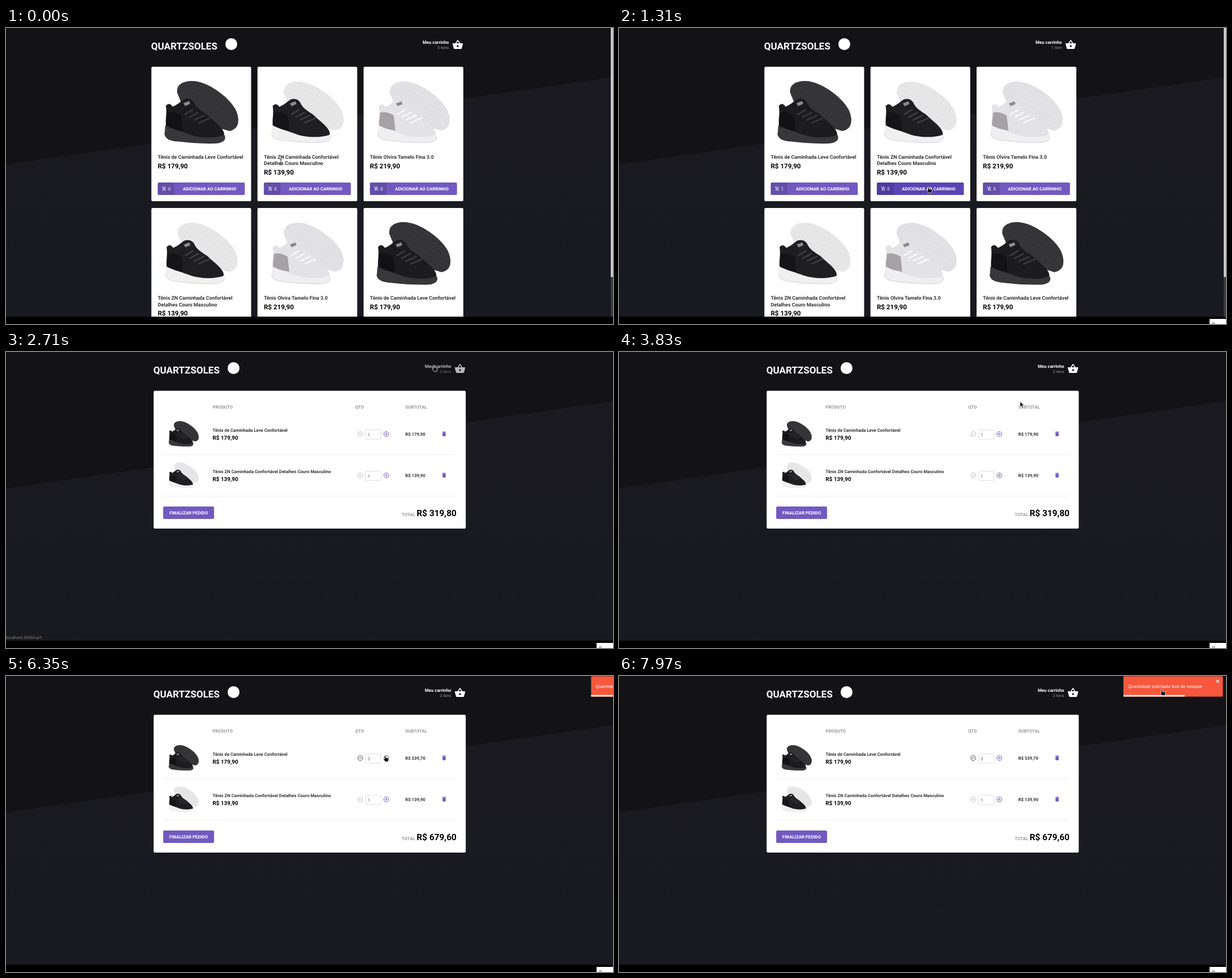
An HTML page for the animation above (8000 ms loop, 1071 by 523 pixels).

```html
<!DOCTYPE html>
<html lang="pt-BR">
<head>
<meta charset="utf-8">
<title>Carrinho</title>
<style>
  html, body { margin: 0; width: 100%; height: 100%; overflow: hidden; background: #000; }
  svg { display: block; width: 1071px; height: 523px; }
  text { font-family: Roboto, sans-serif; font-weight: 700; text-rendering: geometricPrecision; white-space: pre; }
  .thin { font-weight: 400; }
  .toast text { font-family: "Liberation Sans", Arial, sans-serif; font-weight: 400; }
  .status text { font-family: "Noto Sans", sans-serif; font-weight: 400; }
  .add.hover .fill { fill: #5b43b4; }
  .link.hover { opacity: .7; }
</style>
</head>
<body>
<svg id="stage" viewBox="0 0 1071 523" xmlns="http://www.w3.org/2000/svg"></svg>
<script>
const LOOP = 8000;
const PURPLE = '#7159c1';
const PATHS = {
  basket: 'M17.21 9l-4.38-6.56c-.19-.28-.51-.42-.83-.42-.32 0-.64.14-.83.43L6.79 9H2c-.55 0-1 .45-1 1 0 .09.01.18.04.27l2.54 9.27c.23.84 1 1.46 1.92 1.46h13c.92 0 1.69-.62 1.93-1.46l2.54-9.27L23 10c0-.55-.45-1-1-1h-4.79zM9 9l3-4.4L15 9H9zm3 8c-1.1 0-2-.9-2-2s.9-2 2-2 2 .9 2 2-.9 2-2 2z',
  addCart: 'M11 9h2V6h3V4h-3V1h-2v3H8v2h3v3zm-4 9a2 2 0 1 0 0 4 2 2 0 0 0 0-4zm10 0a2 2 0 1 0 0 4 2 2 0 0 0 0-4zm-9.83-3.25l.03-.12.9-1.63h7.45c.75 0 1.41-.41 1.75-1.03l3.86-7.01L19.42 4h-.01l-1.1 2-2.76 5H8.53L4.27 2H1v2h2l3.6 7.59-1.35 2.45c-.16.28-.25.61-.25.96 0 1.1.9 2 2 2h12v-2H7.42c-.13 0-.25-.11-.25-.25z',
  trash: 'M6 19c0 1.1.9 2 2 2h8c1.1 0 2-.9 2-2V7H6v12zM19 4h-3.5l-1-1h-5l-1 1H5v2h14V4z',
  hand: 'M-1.2 1Q0-.4 1.1 1V4.6Q2.2 3.9 2.9 4.8Q4 4.2 4.6 5.2Q6 4.8 6.1 6.4V8.6L5 11.4H.2L-2.9 7.4Q-3.2 5.9-1.2 6.6Z',
  arrow: 'M0 0V10L2.4 7.9L4 11.5L5.6 10.8L4 7.3H7.2Z',
  ibeam: 'M-2-5Q0-5 0-4Q0-5 2-5M0-4V4M-2 5Q0 5 0 4Q0 5 2 5'
};

const text = (x, y, str, size, fill = '#fff', extra = '') =>
  `<text x="${x}" y="${y}" font-size="${size}" fill="${fill}" ${extra}>${str}</text>`;
const box = (x, y, w, h, fill, extra = '') =>
  `<rect x="${x}" y="${y}" width="${w}" height="${h}" fill="${fill}" ${extra}/>`;
const icon = (name, x, y, size, fill) =>
  `<path d="${PATHS[name]}" transform="translate(${x} ${y}) scale(${size / 24})" fill="${fill}"/>`;

const WALK = 'Tênis de Caminhada Leve Confortável';
const LEATHER = ['Tênis ZN Caminhada Confortável', 'Detalhes Couro Masculino'];
const PRODUCTS = {
  dark: { lines: [WALK], price: 'R$ 179,90', back: '#39393b', ridge: '#2b2b2d', upper: '#1c1c1e', sole: '#38383b', heel: '#121214', lace: '#3d3d40' },
  duo: { lines: LEATHER, price: 'R$ 139,90', back: '#ebebec', ridge: '#dadadc', upper: '#1f1f22', sole: '#f0f0f1', heel: '#151517', lace: '#424246' },
  light: { lines: ['Tênis Olvira Tamelo Fina 3.0'], price: 'R$ 219,90', back: '#e6e5e7', ridge: '#d5d4d7', upper: '#e3e2e4', sole: '#efeff1', heel: '#a5a1a5', lace: '#fafafa' }
};

// Centred on its own middle, about 130 by 111.
function shoe(kind, x, y, scale) {
  const p = PRODUCTS[kind];
  const sole = 'M302 114C300 98 316 92 334 94C362 98 396 125 406 146C413 163 411 179 394 182L360 172L310 134Z';
  const laces = [0, 1, 2, 3].map(i => `M${315 + i * 8} ${153 + i * 5}l${15 + i * 2} -9`).join('');
  return `<g transform="translate(${x} ${y}) scale(${scale}) translate(-345 -148.5)">
    <path d="${sole}" fill="${p.back}"/><path d="${sole}" fill="url(#ridge-${kind})"/>
    <path d="M282 138C285 133 290 133 294 139C302 136 308 130 314 126C322 123 329 126 332 132C336 142 346 147 356 154C368 166 384 176 385 187L383 196H330L284 181C279 165 285 152 282 138Z" fill="${p.upper}"/>
    <path d="M284 150C292 147 302 150 309 155L312 182L283 176C281 167 285 159 284 150Z" fill="${p.heel}"/>
    <path d="${laces}" stroke="${p.lace}" stroke-width="2.4" fill="none"/>
    <path d="M313 133l10-4 2 5-9 4z" fill="#8b8b8e"/>
    <path d="M281 172C296 180 312 183 326 189C345 195 370 195 386 189C388 197 382 203 368 203.5C345 204 320 202 304 200C290 199 281 196 280 186Z" fill="${p.sole}"/>
    <path d="M280 186C281 196 290 199 304 200C320 202 345 204 368 203.5C382 203 387 198 386 192" fill="none" stroke="${p.ridge}" stroke-width="1.2"/>
  </g>`;
}

function card(kind, col, row) {
  const p = PRODUCTS[kind];
  const x = 256.5 + col * 187.2, y = 68.5 + row * 249.4, left = x + 11.2;
  const priceY = y + 179 + (p.lines.length - 1) * 11.2;
  return box(x, y, 176, 237.6, '#fff', 'rx="2.2"') + shoe(kind, x + 88.5, y + 80, kind === 'dark' ? 1 : .98) +
    p.lines.map((s, i) => text(left, y + 162.4 + i * 11.2, s, 8.9, '#333')).join('') +
    text(left, priceY, p.price, 11.6, '#000') +
    `<g class="add">${box(left, y + 204.4, 153.6, 22.2, PURPLE, 'class="fill" rx="2.2"')}
      ${box(left, y + 204.4, 29.3, 22.2, '#000', 'opacity=".12" rx="2.2"')}
      ${icon('addCart', left + 6.9, y + 210.9, 8.9, '#fff')}
      ${text(left + 18.4, y + 218.4, '0', 7.8, '#fff', 'class="thin count"')}
      ${text(left + 91.5, y + 218.2, 'ADICIONAR AO CARRINHO', 7.81, '#fff', 'text-anchor="middle"')}</g>`;
}

const round = (x, y, color, plus, cls) =>
  `<g class="${cls}" stroke="${color}" fill="none" stroke-width="1"><circle cx="${x}" cy="${y}" r="4.3"/>
   <path d="M${x - 2.3} ${y}h4.6${plus ? `M${x} ${y - 2.3}v4.6` : ''}"/></g>`;

function row(kind, y) {
  const p = PRODUCTS[kind];
  return shoe(kind, 313.7, y - .5, .406) +
    text(364.5, y - 4, p.lines.join(' '), 7.78, '#333') + text(364.5, y + 10, p.price, 9.9, '#000') +
    round(625, y, '#bdbdc0', false, 'minus') + round(671, y, PURPLE, true, 'plus') +
    box(634.5, y - 7.2, 27.5, 16.2, '#fff', 'rx="1.5" stroke="#ddd"') +
    text(638, y + 4, '1', 7.8, '#666', 'class="thin qty"') +
    text(704.5, y + 3, p.price, 7.75, '#333', 'class="sub"') +
    icon('trash', 767.4, y - 6, 11.2, PURPLE) + box(278, y + 36, 515, 1, '#eee');
}

const ridges = Object.entries(PRODUCTS).map(([k, p]) =>
  `<pattern id="ridge-${k}" width="4" height="4" patternUnits="userSpaceOnUse" patternTransform="rotate(28)">
   <path d="M0 0V4" stroke="${p.ridge}" stroke-width="2.4"/></pattern>`).join('');

const stage = document.getElementById('stage');
stage.innerHTML = `<defs>${ridges}
    <linearGradient id="slope" x1="0" y1="0" x2="0" y2="1"><stop offset="0" stop-color="#1a1a20"/><stop offset="1" stop-color="#191920"/></linearGradient>
  </defs>
  ${box(0, 0, 1071, 523, '#131316')}
  <path d="M0 241L1071 87V510H0Z" fill="url(#slope)"/>
  <g id="header">
    ${text(256, 38, 'QUARTZSOLES', 17)}
    <circle cx="397.5" cy="28.5" r="10.5" fill="#fff"/>
    <g class="link">
      ${text(781.5, 27.8, 'Meu carrinho', 7.8, '#fff', 'text-anchor="end"')}
      ${text(781.5, 37, '', 6.7, '#999', 'class="thin items" text-anchor="end"')}
      ${icon('basket', 787, 19.4, 20.1, '#fff')}
    </g>
  </g>
  <g id="shop">
    ${['dark', 'duo', 'light', 'duo', 'light', 'dark'].map((k, i) => card(k, i % 3, i / 3 | 0)).join('')}
    ${box(1067, 0, 4, 510, '#3a3a40')}${box(1067, 0, 4, 440, '#c9c9c9')}
  </g>
  <g id="cart">
    ${box(260.5, 68.5, 550.7, 243.5, '#fff', 'rx="2.2"')}
    ${text(364.5, 100, 'PRODUTO', 7.81, '#999')}${text(616.3, 100, 'QTD', 7.81, '#999')}${text(704.5, 100, 'SUBTOTAL', 7.81, '#999')}
    ${row('dark', 145)}${row('duo', 218)}
    ${box(277.3, 273, 89.8, 22, PURPLE, 'rx="2.2"')}
    ${text(322.3, 286.8, 'FINALIZAR PEDIDO', 7.81, '#fff', 'text-anchor="middle"')}
    ${text(698.3, 289.6, 'TOTAL', 7.81, '#999')}
    ${text(794.8, 289.6, '', 15.4, '#000', 'text-anchor="end" class="total"')}
  </g>
  ${box(0, 510, 1071, 13, '#000')}
  <g class="status">${box(0, 498, 68, 12, '#1a1a1d')}${text(-.6, 507, 'localhost:3000/cart', 7.1, '#87878b')}</g>
  <g id="corner">${box(1042, 514, 29, 9, '#fff')}${text(1046.5, 526.3, 'R', 8, '#333', 'class="thin"')}</g>
  <g class="toast">
    ${box(890, .5, 175.5, 36, '#f6573d', 'rx="1.5"')}
    ${text(897.8, 21, 'Quantidade solicitada fora de estoque', 7.81)}
    <path d="M1053.8 6.8l5 5m0-5l-5 5" stroke="#fff" stroke-width="1.2"/>
    ${box(890, 33.6, 118, 2.8, '#fff', 'opacity=".88" class="bar"')}
  </g>
  <path id="cursor" stroke-linejoin="round"/>`;

const $ = s => stage.querySelector(s);
const all = s => [...stage.querySelectorAll(s)];
const ui = {
  header: $('#header'), link: $('.link'), items: $('.items'), shop: $('#shop'), cart: $('#cart'),
  adds: all('.add'), counts: all('.count'), minus: $('.minus'), plus: $('.plus'), qty: $('.qty'),
  sub: $('.sub'), total: $('.total'), status: $('.status'), corner: $('#corner'),
  toast: $('.toast'), bar: $('.bar'), cursor: $('#cursor')
};
const show = (el, on) => el.setAttribute('visibility', on ? 'visible' : 'hidden');
const money = v => 'R$ ' + v.toFixed(2).replace('.', ',');

// The screen refreshes every 100 ms, counted from the latest of these times.
const RUNS = [0, 110, 2830, 6350, 6470];
function refresh(t) {
  const run = Math.max(...RUNS.filter(r => r <= t));
  return run + Math.floor((t - run) / 100) * 100;
}

// Pointer stops: time, x, y
const STOPS = [
  [0, 485, 237], [100, 478, 241], [410, 362, 281], [910, 360, 281], [1210, 546, 280], [1810, 547, 280],
  [2310, 755, 23], [3510, 755, 23], [4110, 669, 140], [6400, 669, 140], [6910, 772, 58], [6970, 772, 58],
  [7070, 894, 30], [7210, 962, 20], [7500, 960, 22], [7970, 958, 23]
];

// Value between two neighbouring keys [time, ...values], with easing.
function between(keys, t, ease) {
  const i = keys.findIndex(k => k[0] > t);
  if (i < 0) return keys[keys.length - 1].slice(1);
  if (i === 0) return keys[0].slice(1);
  const [t0, ...a] = keys[i - 1], [t1, ...b] = keys[i];
  const e = ease((t - t0) / (t1 - t0));
  return a.map((v, n) => v + (b[n] - v) * e);
}
const smooth = p => p * p * (3 - 2 * p);
const easeOut = p => 1 - (1 - p) ** 3;

// Toast offset while it bounces in from the right
const BOUNCE = [[0, 1675], [.6, -14], [.75, 5.6], [.9, -2.8], [1, 0]];

function draw(now) {
  const t = now % LOOP;
  const step = refresh(t);
  const [x, y] = between(STOPS, step, smooth);
  const inCart = t >= 2710, shift = inCart ? 4 : 0;
  const inside = (l, top, r, b) => x >= l && x <= r && y >= top && y <= b;

  show(ui.shop, !inCart);
  show(ui.cart, inCart);
  show(ui.corner, t >= 410);
  ui.header.setAttribute('transform', `translate(${shift} 0)`);

  const counts = [t >= 710 ? 1 : 0, t >= 1510 ? 1 : 0];
  const items = counts[0] + counts[1];
  ui.items.textContent = items + (items === 1 ? ' item' : ' itens');
  let hand = false;
  ui.adds.forEach((el, i) => {
    const left = 267.7 + i * 187.2;
    const over = !inCart && i < 3 && inside(left, 273, left + 153.6, 295);
    el.classList.toggle('hover', over);
    ui.counts[i].textContent = counts[i] || 0;
    hand = hand || over;
  });

  const onLink = inside(735 + shift, 19, 807 + shift, 39);
  ui.link.classList.toggle('hover', onLink);
  show(ui.status, onLink);

  const qty = t >= 5050 ? 3 : t >= 4430 ? 2 : 1;
  ui.qty.textContent = qty;
  ui.sub.textContent = money(179.9 * qty);
  ui.total.textContent = money(179.9 * qty + 139.9);
  ui.minus.setAttribute('stroke', qty > 1 ? '#4a4a50' : '#bdbdc0');
  const onPlus = inCart && inside(665, 139, 677, 151);
  ui.plus.setAttribute('stroke', onPlus ? '#55555c' : PURPLE);

  const toast = t >= 6350;
  const [slide] = between(BOUNCE, (step - 6120) / 700, easeOut);
  show(ui.toast, toast);
  ui.toast.setAttribute('transform', `translate(${slide.toFixed(2)} 0)`);
  ui.bar.setAttribute('width', Math.min(175.5, Math.max(108, 118 - (step - 6970) * .058)));
  hand = hand || onLink || onPlus || (toast && inside(890, 0, 1066, 36));

  const kind = hand ? 'hand' : t < 200 ? 'ibeam' : 'arrow';
  const beam = kind === 'ibeam';
  ui.cursor.setAttribute('d', PATHS[kind]);
  ui.cursor.setAttribute('fill', beam ? 'none' : '#0c0c0e');
  ui.cursor.setAttribute('stroke', beam ? '#222' : '#fff');
  ui.cursor.setAttribute('stroke-width', beam ? 1 : .8);
  ui.cursor.setAttribute('transform', `translate(${x.toFixed(1)} ${y.toFixed(1)})`);
}

const start = performance.now();
function tick() {
  draw(Math.max(0, performance.now() - start));
  requestAnimationFrame(tick);
}
tick();
</script>
</body>
</html>
```
